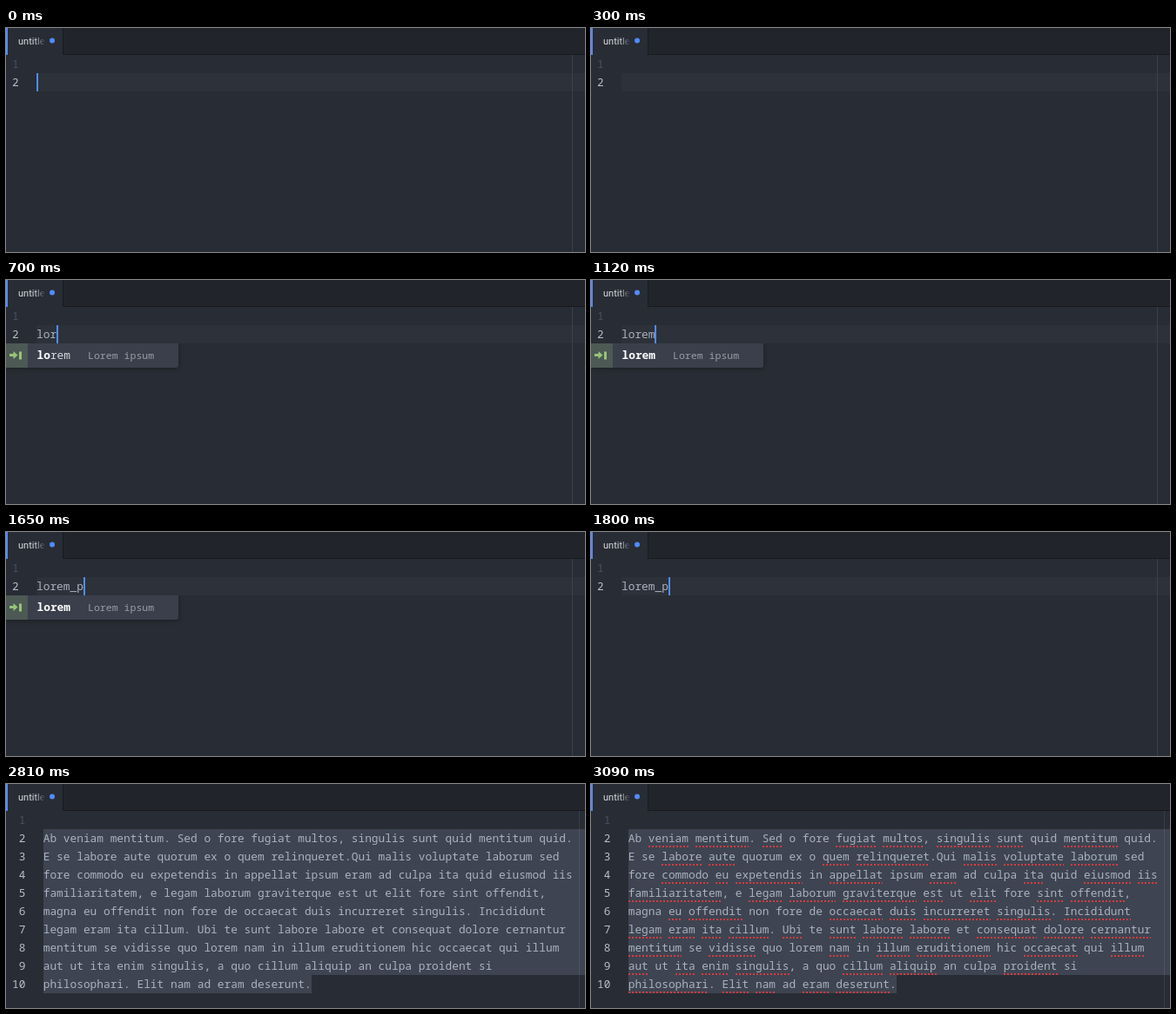
Write an HTML page with a canvas that moves like this. It is 665x258 px and loops after 4830 ms.

```html
<!DOCTYPE html>
<html lang="en">
<head>
<meta charset="utf-8">
<title>Editor snippet</title>
<style>
  html, body { margin: 0; width: 100%; height: 100%; overflow: hidden; background: #282c34; }
  canvas { display: block; }
</style>
</head>
<body>
<canvas id="stage" width="665" height="258"></canvas>
<script>
const ctx = document.getElementById('stage').getContext('2d');
const LOOP = 4830, W = 665, H = 258;
const ROW = 21, TOP = 31, CHAR = 7.7;
const MONO = '"Noto Sans Mono", "DejaVu Sans Mono", monospace';
const CODE = `12.83px ${MONO}`, BOLD = `bold ${CODE}`, SMALL = `11.55px ${MONO}`;
const BLUE = '#528bff', GREEN = '#98c379', TEXT = '#abb2bf';

const paragraph = [
  'Ab veniam mentitum. Sed o fore fugiat multos, singulis sunt quid mentitum quid.',
  'E se labore aute quorum ex o quem relinqueret.Qui malis voluptate laborum sed',
  'fore commodo eu expetendis in appellat ipsum eram ad culpa ita quid eiusmod iis',
  'familiaritatem, e legam laborum graviterque est ut elit fore sint offendit,',
  'magna eu offendit non fore de occaecat duis incurreret singulis. Incididunt',
  'legam eram ita cillum. Ubi te sunt labore labore et consequat dolore cernantur',
  'mentitum se vidisse quo lorem nam in illum eruditionem hic occaecat qui illum',
  'aut ut ita enim singulis, a quo cillum aliquip an culpa proident si',
  'philosophari. Elit nam ad eram deserunt.'
];
// Words the spell checker accepts
const known = new Set(('Ab o fore quid E e se quorum ex Qui sed in ipsum ad culpa ut magna non ' +
  'de te et quo lorem hic qui a an si').split(' '));

const typed = 'lorem_p';
const keyTimes = [450, 570, 700, 850, 980, 1370, 1650];
const matchTimes = [450, 700, 850, 980, 1120];   // the popup trails the typing
const countPassed = (times, t) => times.filter(at => t >= at).length;
const within = (t, from, to) => t >= from && t < to;
const rowTop = line => TOP + (line - 1) * ROW;

function rect(x, y, w, h, color) {
  ctx.fillStyle = color;
  ctx.fillRect(x, y, w, h);
}

function text(str, x, y, color, font = CODE) {
  ctx.font = font;
  ctx.fillStyle = color;
  ctx.fillText(str, x, y);
}

function drawTabs() {
  rect(0, 0, W, 30, '#21252b');
  rect(66, 30, W - 66, 1, '#181a1f');
  rect(0, 0, 65, 31, '#282c34');
  rect(65, 0, 1, 31, '#181a1f');
  rect(0, 0, 2, 31, BLUE);
  const fade = ctx.createLinearGradient(33, 0, 45, 0);
  fade.addColorStop(0, '#d7dae0');
  fade.addColorStop(1, '#d7dae000');
  text('untitle', 14, 19, fade, '11px Roboto, sans-serif');
  ctx.fillStyle = BLUE;
  ctx.beginPath();
  ctx.arc(53, 14.5, 3, 0, 7);
  ctx.fill();
}

function drawGutter(lines) {
  for (let n = 1; n <= lines; n++) {
    const x = 7 + (String(lines).length - String(n).length) * CHAR;
    text(n, x, rowTop(n) + 15, n === 1 ? '#495162' : '#b8beca');
  }
}

function underline(str, x, line) {
  for (const { 0: word, index } of str.matchAll(/\w+/g)) {
    if (known.has(word)) continue;
    const from = Math.round(x + index * CHAR);
    const to = Math.round(x + (index + word.length) * CHAR);
    for (let dot = from; dot < to; dot += 4)
      rect(dot, rowTop(line) + 19, Math.min(2, to - dot), 2, '#d63c40');
  }
}

function drawIcon(y) {
  ctx.fillStyle = GREEN;
  ctx.fill(new Path2D(`M4 ${y - 1.5}h4.5v-3l5 4.5l-5 4.5v-3h-4.5z`));
  rect(15, y - 4, 3, 9, GREEN);
}

function drawPopup(matched) {
  const wide = matched === 1;
  const width = wide ? 215 : 198;
  const items = wide
    ? [['legal', 'Copyright Notice'], ['lorem', 'Lorem ipsum']]
    : [['lorem', 'Lorem ipsum']];
  const box = new Path2D();
  box.roundRect(0, 73, width, items.length * 28, [0, 0, 3, 0]);

  ctx.save();
  ctx.beginPath();
  ctx.rect(0, 73, W, H);
  ctx.clip();
  ctx.shadowColor = 'rgba(0,0,0,.35)';
  ctx.shadowBlur = 6;
  ctx.shadowOffsetY = 1;
  ctx.fillStyle = '#282c34';
  ctx.fill(box);
  ctx.shadowColor = 'transparent';
  ctx.clip(box);
  items.forEach(([name, description], i) => {
    const y = 73 + i * 28, selected = i === 0;
    if (selected) rect(0, y, width, 28, '#3a3f4b');
    rect(0, y, 25, 28, 'rgba(152,195,121,.2)');
    drawIcon(y + 13.5);
    text(name.slice(0, matched), 35.5, y + 18, '#ffffff', BOLD);
    text(name.slice(matched), 35.5 + matched * CHAR, y + 18, selected ? '#d7dae0' : '#a4abb8');
    text(description, wide ? 86.5 : 94, y + 18, selected ? '#999da6' : '#70757f', SMALL);
  });
  ctx.restore();
}

function drawTyping(t) {
  const str = typed.slice(0, countPassed(keyTimes, t));
  rect(35, 52, W - 35, ROW, '#2c313a');
  rect(650, TOP, 1, H, '#3b4049');
  drawGutter(2);
  text(str, 35, 67, TEXT);
  if (t >= 1950) underline(str, 35, 2);
  if (!within(t, 300, 450) && !within(t, 2260, 2560))
    rect(Math.round(34.9 + str.length * CHAR), 52, 2, ROW, BLUE);
  if (within(t, 450, 1800)) drawPopup(countPassed(matchTimes, t));
}

function drawParagraph(checked) {
  const last = paragraph.length - 1;
  rect(43, 52, W - 43, last * ROW, '#3e4451');
  rect(43, 52 + last * ROW, Math.round(paragraph[last].length * CHAR), ROW, '#3e4451');
  rect(658, TOP, 1, H, 'rgba(171,178,191,.13)');
  drawGutter(10);
  paragraph.forEach((str, i) => {
    text(str, 42.7, rowTop(i + 2) + 15, TEXT);
    if (checked) underline(str, 42.7, i + 2);
  });
}

function draw(t) {
  rect(0, 0, W, H, '#282c34');
  drawTabs();
  if (t < 2810) drawTyping(t);
  else drawParagraph(t >= 3090);
}

const start = performance.now();
function tick() {
  draw((performance.now() - start) % LOOP);
  requestAnimationFrame(tick);
}
tick();
</script>
</body>
</html>
```
